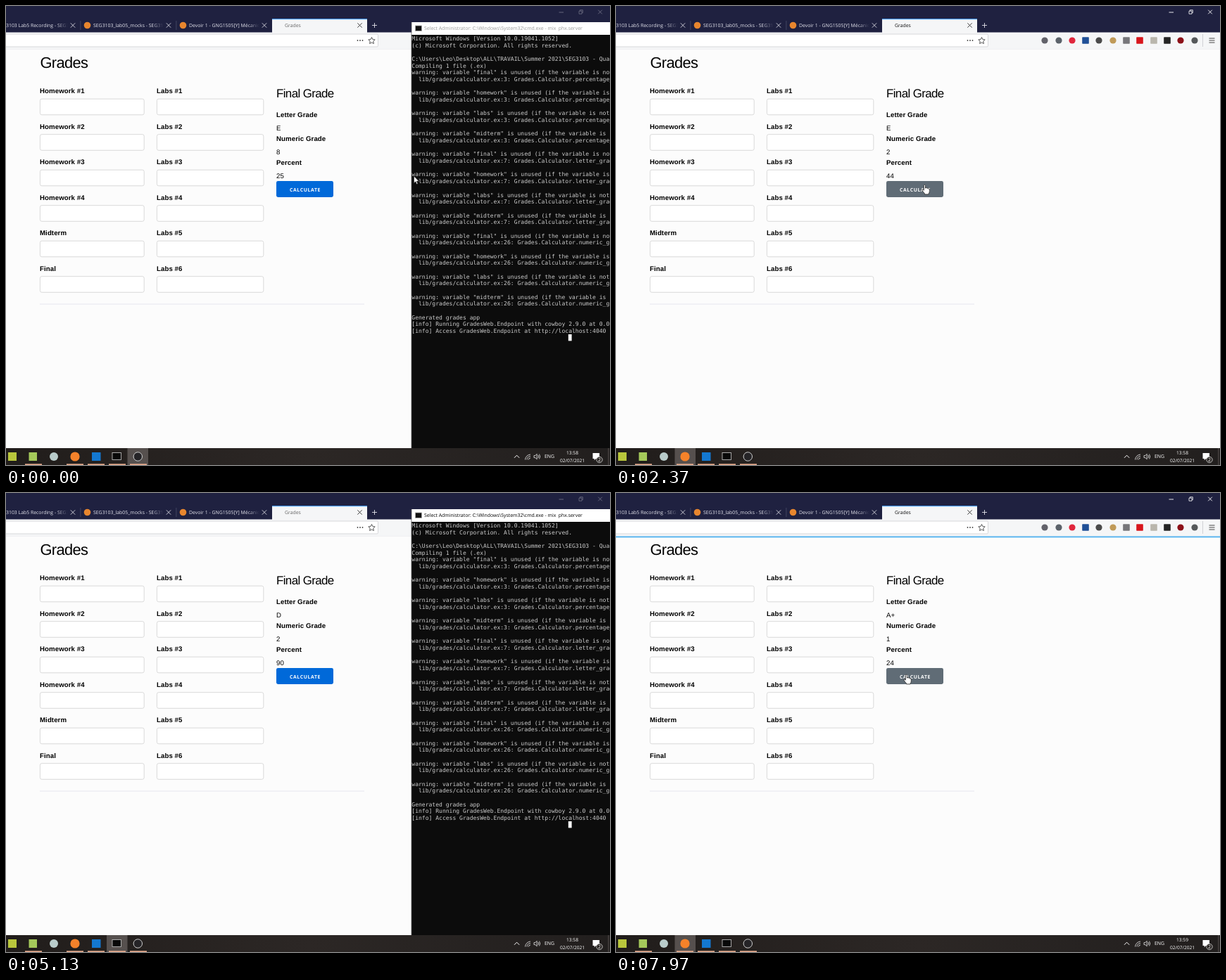
Recreate the animation shown at these times as an HTML page. Size 858 by 653 pixels, loop 8 s.

```html
<!DOCTYPE html>
<html lang="en">
<head>
<meta charset="utf-8">
<title>Grades</title>
<style>
html, body { margin: 0; width: 100%; height: 100%; overflow: hidden; background: #fcfcfc; }
svg { display: block; text-rendering: geometricPrecision; }
text { white-space: pre; }
.ui { font: 6.9px "Open Sans", "Noto Sans", sans-serif; }
.page { font: 9.65px "Liberation Sans", Arial, sans-serif; letter-spacing: .01em; fill: #000; }
.label { font-weight: 700; }
.head { letter-spacing: -.605px; }
.mono { font: 8.05px "DejaVu Sans Mono", "Liberation Mono", monospace; fill: #ccc; }
</style>
</head>
<body>
<svg id="stage" width="858" height="653" viewBox="0 0 858 653"></svg>
<script>
const LOOP = 8000;
const stage = document.getElementById('stage');

const rect = (x, y, w, h, fill, more = '') =>
  `<rect x="${x}" y="${y}" width="${w}" height="${h}" fill="${fill}" ${more}/>`;
const disc = (x, y, r, fill, more = '') => `<circle cx="${x}" cy="${y}" r="${r}" fill="${fill}" ${more}/>`;
const line = (d, color, w = 1, more = '') =>
  `<path d="${d}" fill="none" stroke="${color}" stroke-width="${w}" ${more}/>`;
const text = (x, y, str, cls, more = '') => `<text x="${x}" y="${y}" class="${cls}" ${more}>${str}</text>`;
const cross = (x, y, r, color) =>
  line(`M${x - r} ${y - r}l${2 * r} ${2 * r}m0 ${-2 * r}l${-2 * r} ${2 * r}`, color, .9);

function tabBar() {
  const tabs = [
    [0, 88, 95, '3103 Lab5 Recording - SEG3103'],
    [124, 224, 231, 'SEG3103_lab05_mocks - SEG3103'],
    [260, 360, 367, 'Devoir 1 - GNG1505[Y] Mécanique']
  ];
  let out = rect(0, 0, 858, 38, '#1f2140');
  tabs.forEach(([x, end, close, title], i) => {
    out += `<clipPath id="clip${i}">${rect(x, 19, end - x, 17, '#fff')}</clipPath>`
      + text(x, 30, title, 'ui', `fill="#e4e4ec" clip-path="url(#clip${i})"`)
      + rect(end - 16, 20, 16, 15, 'url(#fade)')
      + cross(close, 27.5, 3.2, '#d8d8e0');
    if (x) out += disc(x - 8.5, 27.5, 4.8, '#e8862e') + rect(x - 18.5, 21, .8, 13, '#4a4c68');
  });
  return out + rect(378, 18, 135, 20, '#f5f6f7') + rect(378, 18, 135, 1.2, '#4a9cf0')
    + text(396, 30, 'Grades', 'ui', 'id="tabTitle"')
    + cross(502.5, 27.5, 3.2, '#333')
    + line('M520 27.5h7m-3.5-3.5v7', '#e0e0e8', .9)
    + '<g id="controls">' + line('M785.5 9h6.5', '#fff', .9)
    + line('M814 7.2h4v4h-4zM815.3 7v-1.3h4v4h-1.2', '#fff', .8)
    + cross(844, 8.5, 2.8, '#fff') + '</g>';
}

function toolBar() {
  const add = [
    [609, '#62626a', 1], [629, '#5b626a', 1], [648, '#e0263c', 1], [667, '#1f4f96', 0],
    [686, '#4a4a4a', 1], [706, '#c09a58', 1], [725, '#76767a', 0], [744, '#d8161c', 0],
    [764, '#b9b6ac', 0], [783, '#242424', 0], [802, '#8c1018', 1], [822, '#55585a', 1]
  ];
  let out = rect(0, 37.5, 858, 24, '#f5f6f7')
    + rect(-6, 40, 534.5, 18, '#fff', 'rx="1.5" stroke="#cfcfd2" stroke-width=".8"');
  for (const dx of [-3.5, 0, 3.5]) out += disc(503 + dx, 49, .9, '#444');
  out += line('M519.5 44.5l1.4 3 3.3.4-2.4 2.3.6 3.3-2.9-1.6-2.9 1.6.6-3.3-2.4-2.3 3.3-.4z', '#444', .9);
  for (const [x, color, round] of add)
    out += round ? disc(x, 49, 4.6, color) : rect(x - 4.8, 44.2, 9.6, 9.6, color, 'rx=".8"');
  return out + rect(833, 40, .8, 18, '#c8c8cc')
    + line('M842.5 46h8m-8 3h8m-8 3h8', '#444', 1) + rect(0, 61, 858, .7, '#dedee2');
}

function page() {
  const field = (x, w, y) => rect(x, y, w, 22.6, '#fff', 'rx="2.4" stroke="#d1d1d1" stroke-width=".8"');
  const left = ['Homework #1', 'Homework #2', 'Homework #3', 'Homework #4', 'Midterm', 'Final'];
  let out = rect(0, 61.5, 858, 568, '#fcfcfc') + text(48.5, 88, 'Grades', 'page head', 'style="font-size:21.8px"');
  left.forEach((name, i) => {
    const y = 124 + 50.5 * i;
    out += text(48, y, name, 'page label') + text(214, y, 'Labs #' + (i + 1), 'page label')
      + field(48.4, 147.8, y + 8.2) + field(214.4, 151.4, y + 8.2);
  });
  out += rect(48, 423.6, 461, .9, '#e3e4ee')
    + text(384, 130, 'Final Grade', 'page head', 'style="font-size:16.9px"');
  ['Letter Grade', 'Numeric Grade', 'Percent'].forEach((name, i) => {
    out += text(384, 158.4 + 34 * i, name, 'page label') + text(384, 176.6 + 34 * i, '', 'page', `id="value${i}"`);
  });
  return out + rect(384, 249, 81, 23, '#0069d9', 'rx="2.4" id="button"')
    + text(403, 264, 'CALCULATE', 'ui', 'fill="#fff" style="font-weight:700;letter-spacing:.605px"')
    + rect(0, 61.5, 858, 1.9, '#55b4f0', 'id="progress"');
}

function terminal() {
  const rows = [
    'Microsoft Windows [Version 10.0.19041.1052]',
    '(c) Microsoft Corporation. All rights reserved.', '',
    'C:\\Users\\Leo\\Desktop\\ALL\\TRAVAIL\\Summer 2021\\SEG3103 - Quality',
    'Compiling 1 file (.ex)'
  ];
  for (const [num, fn] of [[3, 'percentage_grade'], [7, 'letter_grade'], [26, 'numeric_grade']])
    for (const name of ['final', 'homework', 'labs', 'midterm'])
      rows.push(`warning: variable "${name}" is unused (if the variable is not meant`,
        `  lib/grades/calculator.ex:${num}: Grades.Calculator.${fn}/1`, '');
  rows.push('Generated grades app',
    '[info] Running GradesWeb.Endpoint with cowboy 2.9.0 at 0.0.0.0:4040',
    '[info] Access GradesWeb.Endpoint at http://localhost:4040');
  return '<g id="terminal">' + rect(576, 23, 282, 606, '#0c0c0c') + rect(576, 23, 282, 18, '#fff')
    + rect(581.5, 28, 9, 7.5, '#111', 'stroke="#aaa" stroke-width=".8"')
    + text(594, 34.4, 'Select Administrator: C:\\Windows\\System32\\cmd.exe - mix  phx.server', 'ui', 'id="termTitle"')
    + rows.map((row, i) => text(576.3, 49 + 9.674 * i, row, 'mono')).join('')
    + rect(798.8, 467, 4.8, 9.4, '#fff', 'id="caret"') + rect(575.6, 23, .8, 606, '#555') + '</g>';
}

function taskBar() {
  let out = rect(0, 629, 858, 24, 'url(#bar)') + rect(0, 629, 29.5, 24, '#56504e', 'id="current"');
  for (const x of [27, 86, 116, 146, 176]) out += rect(x, 651.4, 24, 1.6, '#efb192');
  return out + rect(3, 635, 12, 12, '#b9c63c') + rect(32.5, 635, 11.5, 12, '#a4c95a')
    + disc(68, 641, 6, '#b9cccb') + disc(98, 641, 6.6, '#f5822a') + rect(122, 635, 12.5, 12, '#1478d0')
    + rect(151, 635.5, 12.5, 10, '#080808', 'stroke="#b8b8b8" stroke-width=".9"')
    + disc(187.3, 641, 6.2, '#252427', 'stroke="#d0d0d0" stroke-width="1"')
    + line('M722 642.8l3.6-3.6 3.6 3.6', '#fff', 1)
    + line('M737.5 645.5a8 8 0 0 1 7.5-7.5m-5 7.5a5 5 0 0 1 5-5m-2.6 5a2.6 2.6 0 0 1 2.6-2.6', '#d8d8d8', .9)
    + line('M750 639.6h1.8l2.4-2.2v7.4l-2.4-2.2h-1.8zm6-.6q1.4 2 0 4m1.5-5.4q2.4 3.4 0 6.8', '#eee', .8)
    + text(765, 643.3, 'ENG', 'ui', 'fill="#fff"')
    + text(804.5, 637.7, '', 'ui', 'fill="#fff" text-anchor="middle" id="clock" style="font-size:6.6px"')
    + text(804.5, 648.7, '02/07/2021', 'ui', 'fill="#fff" text-anchor="middle" style="font-size:6.6px"')
    + '<path d="M833.5 636h9.5v8h-5l-2.3 2.3V644h-2.2z" fill="#fff"/>'
    + disc(843, 645.5, 4.2, '#2a2624', 'stroke="#ddd" stroke-width=".8"')
    + text(843, 648, '2', 'ui', 'fill="#fff" text-anchor="middle"')
    + rect(855.5, 629, .7, 24, '#6a6562');
}

const pointers = '<g id="cursor" stroke-linejoin="round">'
  + '<path id="arrow" d="M0 0v10l2.3-2.2 1.6 3.7 1.6-.7-1.6-3.5h3.2z" fill="#fff" stroke="#222" stroke-width=".7"/>'
  + '<path id="hand" d="M-1.2 1q0-1.2 1.1-1.2T1 1v3.8l.2-.8q1.7-.5 2 .8 1.4-.6 2 .7 1.5-.4 1.6 1.1v2.8'
  + 'q0 1.5-1.2 3v1H0v-1q-2-2-3.6-4.8-.4-1.4 1-1.2l1.4 1.3z" fill="#fff" stroke="#222" stroke-width=".8"/></g>';

stage.innerHTML = `<defs>
  <linearGradient id="fade"><stop stop-color="#1f2140" stop-opacity="0"/><stop offset="1" stop-color="#1f2140"/></linearGradient>
  <linearGradient id="bar"><stop stop-color="#211d1b"/><stop offset=".5" stop-color="#2c2725"/><stop offset="1" stop-color="#221f1e"/></linearGradient>
  </defs>` + tabBar() + toolBar() + page() + terminal() + taskBar() + pointers;

const el = {};
stage.querySelectorAll('[id]').forEach(node => el[node.id] = node);
const set = (id, name, value) => el[id].setAttribute(name, value);
const show = (id, on) => set(id, 'visibility', on ? 'inherit' : 'hidden');

const results = [
  [0, 'E', 8, 25], [900, 'E', 2, 44], [2500, 'C+', 3, 67],
  [3500, 'D', 2, 90], [6500, 'F', 10, 51], [7700, 'A+', 1, 24]
];
const clamp = v => Math.min(1, Math.max(0, v));
const ease = v => v * v * (3 - 2 * v);
const mix = (a, b, v) => a + (b - a) * v;

function pointerAt(t) {
  if (t < 5000) {
    const k = ease(clamp((t - 40) / 400));
    return [mix(579.5, 438.5, k), mix(242, 254.5, k)];
  }
  const k = ease(clamp((t - 6150) / 300));
  return [mix(438.5, 412.5, k), mix(254.5, 258.5, k)];
}

function draw(t) {
  const browser = t >= 500 && t < 4100 || t >= 6270;
  const console = t >= 4100 && t < 6270;
  const [x, y] = pointerAt(t);
  const inside = x > 384 && x < 465 && y > 249 && y < 272;
  const hover = inside && (browser || t < 500);

  show('terminal', !browser);
  show('caret', !console || Math.floor((t - 3940) / 530) % 2 === 0);
  set('termTitle', 'fill', console ? '#000' : '#999');
  set('tabTitle', 'fill', browser ? '#111' : '#666');
  set('controls', 'opacity', browser ? 1 : .35);
  set('current', 'x', browser ? 83.5 : console ? 143 : 172.5);
  set('button', 'fill', hover ? '#606c76' : '#0069d9');
  el.clock.textContent = t < 7450 ? '13:58' : '13:59';

  const last = results.filter(r => r[0] <= t).pop();
  for (let i = 0; i < 3; i++) el['value' + i].textContent = last[i + 1];
  const age = last[0] ? t - last[0] : 1000;
  set('progress', 'width', 858 * ease(clamp(age / 200)));
  set('progress', 'opacity', age < 280 ? 1 : clamp((400 - age) / 120));

  show('cursor', t < 3800 || t >= 6150);
  show('arrow', !hover);
  show('hand', hover);
  set('cursor', 'transform', `translate(${x} ${y})`);
}

function tick(now) {
  draw(now % LOOP);
  requestAnimationFrame(tick);
}
draw(0);
requestAnimationFrame(tick);
</script>
</body>
</html>
```
